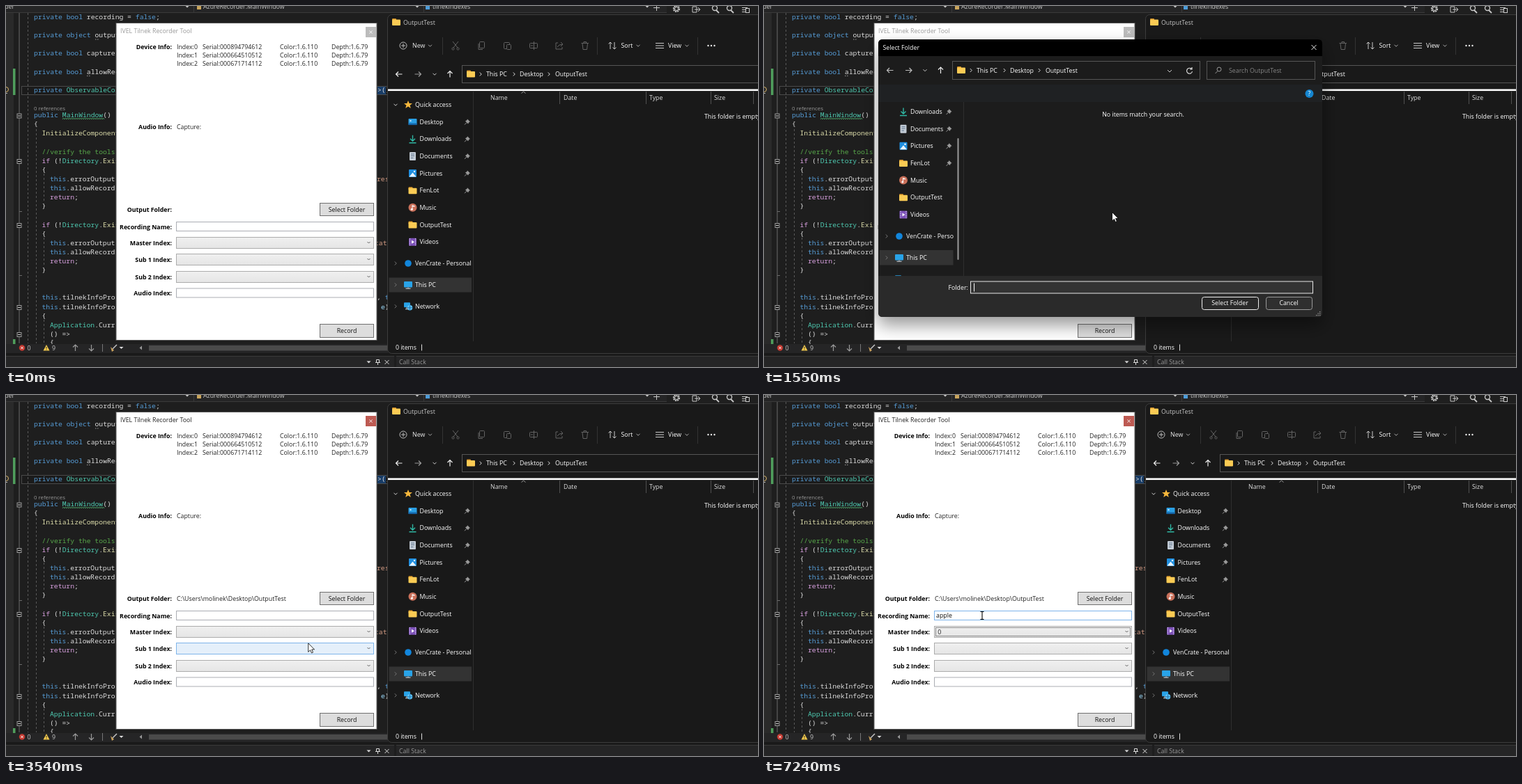
An HTML page that plays this animation: 1079x519 px, repeating every 8000 ms.

```html
<!DOCTYPE html>
<html lang="en">
<head>
<meta charset="utf-8">
<title>Recorder tool</title>
<style>
html, body { margin: 0; width: 100%; height: 100%; overflow: hidden; background: #1e1e1e; }
svg { display: block; }
text { font: 8.8px "Open Sans", "Noto Sans", sans-serif; white-space: pre; }
.b { font-weight: 700; text-anchor: end; }
.m { text-anchor: middle; }
.c { font: 9.73px "Noto Sans Mono", "DejaVu Sans Mono", monospace; }
</style>
</head>
<body>
<svg id="stage" width="1079" height="519" viewBox="0 0 1079 519" xmlns="http://www.w3.org/2000/svg"></svg>
<script>
const LOOP = 8000;

// ---- drawing helpers: every y of a text is the middle of its capitals
const T = (x, y, s, fill = '#fff', attr = '') =>
  `<text x="${x}" y="${y + 3.1}" fill="${fill}" ${attr}>${s}</text>`;
const R = (x, y, w, h, fill, attr = '') =>
  `<rect x="${x}" y="${y}" width="${w}" height="${h}" fill="${fill}" ${attr}/>`;
const box = (x, y, w, h, fill, line, attr = '') =>
  R(x + .5, y + .5, w - 1, h - 1, fill, `stroke="${line}" ${attr}`);
const P = (d, line, attr = '') => `<path d="${d}" fill="none" stroke="${line}" ${attr}/>`;
const F = (d, fill) => `<path d="${d}" fill="${fill}"/>`;
const O = (x, y, r, fill, attr = '') => `<circle cx="${x}" cy="${y}" r="${r}" fill="${fill}" ${attr}/>`;
const G = (id, s, attr = '') => `<g id="${id}" ${attr}>${s}</g>`;
const at = (x, y, s) => `<g transform="translate(${x} ${y})">${s}</g>`;

const down = (x, y, c = '#aaa', w = 2.5) => P(`M${x - w} ${y - w / 2}l${w} ${w}l${w} ${-w}`, c);
const right = (x, y, c = '#ddd', w = 2.5) => P(`M${x - w / 2} ${y - w}l${w} ${w}l${-w} ${w}`, c);
const drop = (x, y, c = '#ddd') => F(`M${x - 3} ${y - 1.5}h6l-3 3z`, c);
const cross = (x, y, r, c) => P(`M${x - r} ${y - r}l${2 * r} ${2 * r}m0 ${-2 * r}l${-2 * r} ${2 * r}`, c);
const arrow = (x, y, turn, c) =>
  `<g transform="translate(${x} ${y}) rotate(${turn})">${P('M-4.5 0H4.5M1 -3.5L4.5 0L1 3.5', c, 'stroke-width="1.2"')}</g>`;

// ---- icons, centred on 0,0
const icon = {
  folder: R(-6, -5, 6, 4, '#d9972a', 'rx="1"') + R(-6, -3.5, 12, 8.5, '#fbcb54', 'rx="1"'),
  desktop: R(-6, -4.5, 12, 9, '#2a9fe4', 'rx="1"') + R(-6, 2, 12, 2.5, '#1464a8') + R(-4, -2.5, 2, 2, '#cfeaff'),
  load: P('M0 -5.5V3M-3.5 -.5L0 3L3.5 -.5M-5 5.5H5', '#2fb8a4', 'stroke-width="1.4"'),
  doc: R(-4.5, -6, 9, 12, '#c3ccd6', 'rx="1"') + P('M-2.5 -3H2.5M-2.5 -.5H2.5M-2.5 2.5H1', '#60758c'),
  pic: R(-5.5, -5.5, 11, 11, '#1f8fe0', 'rx="1"') + F('M-5 5L0 -1L5 5z', '#e9f6ff') + O(2.5, -2.5, 1.2, '#fff'),
  music: O(0, 0, 6, '#c9705a') + F('M-1 -3.5L3 -2.5V-1L0 -1.5V2.5H-1z', '#fff') + O(-1.2, 2.3, 1.5, '#fff'),
  video: R(-5.5, -5.5, 11, 11, '#7d52b8', 'rx="1"') + P('M-4 -5V5M4 -5V5', '#e5d8f8', 'stroke-dasharray="1.5 1.5"') + F('M-1.5 -2.5L2.5 0L-1.5 2.5z', '#fff'),
  store: O(0, 0, 4.8, '#1286dc'),
  pc: R(-6, -5, 12, 8.5, '#29a3e8', 'rx="1"') + R(-1, 3.5, 2, 1.5, '#888') + R(-3.5, 4.7, 7, 1.2, '#b8c4cc'),
  net: R(-6, -5.5, 9, 7, '#29a3e8', 'rx="1"') + P('M-4 4H0M-2 1V4', '#c9d4dc') + O(2.5, 2, 3.8, '#5cc0f2') + P('M-1 2H6M2.5 -1.5V6', '#1769a6', 'stroke-width=".8"'),
  pin: F('M0 -4L4 0L2.5 .5L1 3L-3 -1L-.5 -2.5z', '#9a9a9a') + P('M-1 1L-4 4', '#9a9a9a')
};
const put = (name, x, y) => at(x, y, icon[name]);

const places = [
  ['Desktop', 'desktop', 1], ['Downloads', 'load', 1], ['Documents', 'doc', 1], ['Pictures', 'pic', 1],
  ['FenLot', 'folder', 1], ['Music', 'music'], ['OutputTest', 'folder'], ['Videos', 'video']
];
const sideList = (x, y, list, pinX) =>
  list.map(([name, ic, pin], i) => {
    const v = y + i * 24.65;
    return put(ic, x, v) + T(x + 10, v, name) + (pin ? put('pin', pinX, v) : '');
  }).join('');
const roots = (x, y, list) =>
  list.map(([name, ic], i) =>
    right(x, y + i * 30.9, '#777') + put(ic, x + 18, y + i * 30.9) + T(x + 28, y + i * 30.9, name)).join('');
const trail = (x, y) => put('folder', x, y - .5) +
  right(x + 14, y) + T(x + 22, y, 'This PC') + right(x + 62, y) + T(x + 70, y, 'Desktop') +
  right(x + 112, y) + T(x + 121, y, 'OutputTest');

// ---- code editor
const ink = { k: '#569cd6', p: '#d8a0df', m: '#dcdcaa', t: '#4ec9b0', g: '#57a64a', s: '#d69d85', w: '#dcdcdc', v: '#9cdcfe' };
const code = (x, y, spec) => `<text class="c" x="${x}" y="${y + 3.3}">` +
  spec.split('|').map(s => `<tspan fill="${ink[s[0]]}">${s.slice(1)}</tspan>`).join('') + '</text>';

function editor() {
  const check = 'pif |w(!|tDirectory|w.|mExists';
  const lines = [
    [40, 16, 'kprivate bool |wrecording = |kfalse|w;'], [40, 42, 'kprivate object |woutput'],
    [40, 68, 'kprivate bool |wcapture'], [40, 94.5, 'kprivate bool |wallowRec'],
    [40, 121, 'kprivate |tObservableCol'], [40, 157, 'kpublic |tMainWindow|w()'], [40, 170, 'w{'],
    [51.5, 183, 'mInitializeComponent'], [51.5, 209.5, 'g//verify the tools'],
    [51.5, 223, check], [51.5, 236, 'w{'], [63, 248.5, 'kthis|w.errorOutput'],
    [63, 262, 'kthis|w.allowRecord'], [63, 275, 'preturn|w;'], [51.5, 288, 'w}'],
    [51.5, 314.5, check], [51.5, 328, 'w{'], [63, 341, 'kthis|w.errorOutput'],
    [63, 354, 'kthis|w.allowRecord'], [63, 367, 'preturn|w;'], [51.5, 380, 'w}'],
    [51.5, 419, 'kthis|w.tilnekInfoPro'], [51.5, 432.5, 'kthis|w.tilnekInfoPro'], [51.5, 446, 'w{'],
    [63, 459, 'tApplication|w.Curr'], [63, 471.5, 'w() =&gt;'], [63, 484, 'w{'],
    [533, 121, 'w&gt;()'], [532, 248.5, 'srest'], [529, 341, 'scatio'], [532, 419, 'w, |kt'], [538, 432.5, 've|w)']
  ];
  const dash = 'stroke-dasharray="3 3"';
  return R(0, 0, 1079, 519, '#1e1e1e') + R(0, 10, 11, 476, '#2a2a2a') +
    R(10, 90, 3.5, 38, '#4f9e5c') + R(10, 479, 3.5, 7, '#4f9e5c') +
    box(22, 115, 540, 13, '#1b1b1b', '#4a4a4a') + R(533, 116, 12, 11, '#183c66') +
    O(0, 120, 3.5, 'none', 'stroke="#d9b46a"') + P('M-1 125.5H2', '#bbb') +
    P('M19 10V485', '#6a6a6a') + P('M19 295.500h4M19 387.500h4', '#6a6a6a') +
    P('M31.500 10V485M43.500 177V485M54.500 241V283M54.500 333V375M54.500 451V485', '#5a5a5a', dash) +
    [158, 223.5, 315.5, 433.5, 472.5].map(y => box(15.5, y - 3.5, 7, 7, '#1e1e1e', '#9a9a9a') + P(`M17 ${y}h4`, '#ccc')).join('') +
    lines.map(a => code(...a)).join('') + T(40, 146.5, '0 references', '#999', 'style="font-size:7.8px"') +
    P('M128 48h6M116 100.500h6', '#999', 'stroke-dasharray="1.500 1.500"') +
    P('M81 163' + 'l1.5 -2l1.5 2'.repeat(20), '#4ca56a', 'stroke-width=".9"');
}

function frameBars() {
  const c = '#c8c8c8';
  return R(0, 0, 948, 9.5, '#252526') + R(948, 0, 131, 13, '#1f1f1f') + P('M0 9.500H948', '#3a3a3a') +
    T(-2, 1, 'der', c) + drop(260, 1, c) + R(274, 0, 6, 5, '#c8a45c') + T(283, 1, 'AzureRecorder.MainWindow', c) +
    P('M269.500 0V9M599.500 0V9', '#3a3a3a') + drop(590, 1, c) + R(602, 0, 6, 5, '#4d9bd8') + T(612, 1, 'tilnekIndexes', c) +
    drop(920, 1, c) + P('M929 2.500h9M933.500 0V7', c) +
    O(962, 4, 4, 'none', `stroke="${c}" stroke-width="2.200" stroke-dasharray="2 1"`) + O(962, 4, 2.5, 'none', `stroke="${c}"`) +
    P('M985 1H991V9H985zM988 5H996M993 2L996 5L993 8', c) +
    [1017, 1038].map(x => O(x, 3, 3.5, 'none', `stroke="${c}" stroke-width="1.400"`) + P(`M${x + 2} 6l4 4`, c, 'stroke-width="1.800"')).join('') +
    P('M1056 2.500h8M1056 5.500h5M1056 8.500h5', c) + box(1061, 3, 6, 7, 'none', c) +
    R(0, 486, 548, 13, '#252526') + O(23, 491.5, 4.2, '#c6382f') + cross(23, 491.5, 1.7, '#fff') + T(30.5, 491.5, '0', c) +
    F('M58 487L62.500 495.500H53.500z', '#f2c94c') + P('M58 490V492.500M58 493.500V494.500', '#222') + T(66, 491.5, '9', c) +
    arrow(99.5, 491.5, -90, '#9a9a9a') + arrow(122.5, 491.5, 90, '#9a9a9a') + P('M138.500 486V497', '#777') +
    P('M153 493L159 487', '#c8c8c8', 'stroke-width="1.500"') + F('M150 490L155 495L152 497z', '#cda45e') + drop(165.5, 491.5) +
    F('M195 488.500V494.500L191.500 491.500z', '#999') + R(205, 488, 344, 7.5, '#4a4a4a') +
    R(0, 499, 1079, 4, '#1a1a1a') + R(0, 503, 557, 16, '#252526') + R(560, 503, 519, 16, '#252526') +
    P('M0 503.500H557M560 503.500H1079', '#3a3a3a') +
    drop(520.5, 512) + P('M531.500 508.500h4v4h-4zM530 512.500h7M533.500 513V516', '#ddd') + cross(546.5, 512, 3, '#ddd') +
    T(564, 512, 'Call Stack', '#999');
}

// ---- file browser
function explorer() {
  const dim = '#626262', y = 57;
  return box(547, 12, 560, 488, '#191919', '#3d3d3d', 'rx="6"') +
    put('folder', 560, 23) + T(570, 23.5, 'OutputTest', '#c4c4c4') +
    O(570, y, 5, 'none', 'stroke="#bbb"') + P('M567 57h6M570 54v6', '#bbb') + T(583, y, 'New', '#eee') + down(608.5, y) +
    P('M641 51L648 60M649 51L642 60', dim) + O(641.5, 61.5, 1.6, 'none', `stroke="${dim}"`) + O(648.5, 61.5, 1.6, 'none', `stroke="${dim}"`) +
    box(679, 51, 8, 10, 'none', dim, 'rx="1"') + P('M678 54V62.500H684', dim) +
    box(714, 52, 9, 10, 'none', dim, 'rx="1"') + box(718, 55, 7, 8, '#191919', dim, 'rx="1"') +
    box(751, 53, 12, 8, 'none', dim, 'rx="1"') + P('M757.500 51V63M753 57h3', dim) +
    P('M792 53H789V62H798V59M791 59Q793 55 799 55M796 52L799 55L796 58', dim) +
    P('M825.500 53.500H836M827 54L828 62.500H833.500L834.500 54M829 53V51.500H832.500V53', dim) +
    P('M626.500 45V70M848.500 45V70M992.500 45V70', '#333') +
    P('M867 62V52M864.500 54.500L867 52L869.500 54.500M873 52V62M870.500 59.500L873 62L875.500 59.500', '#ccc') +
    T(882.5, y, 'Sort') + down(907, y) +
    P('M932 53.500H944M932 57H944M932 60.500H944', '#ccc') + T(950, y, 'View') + down(977, y) +
    [1007.5, 1012, 1016.5].map(x => O(x, y, 1.2, '#eee')).join('') +
    arrow(564, 98, 180, '#eee') + arrow(591, 98, 0, '#999') + down(615, 98, '#ccc') + arrow(637, 98, -90, '#eee') +
    box(654, 85, 440, 26, '#191919', '#555') + trail(667, 98) +
    P('M670.500 123V482', '#2e2e2e') +
    R(548, 119.5, 540, 2.6, '#fff') + P('M739.500 125.500l3 -2.500l3 2.500', '#999') +
    T(695, 132, 'Name', '#ddd') + T(800, 132, 'Date', '#ddd') + T(923, 132, 'Type', '#ddd') + T(1016, 132, 'Size', '#ddd') +
    P('M794.500 123V141M918.500 123V141M1011.500 123V141M1072.500 123V141', '#505050') +
    T(1002, 158.5, 'This folder is empty.') +
    R(549.5, 390.5, 118.5, 21, '#333') + G('netHover', R(549.5, 421.5, 119, 21.5, '#484848')) +
    down(559, 142, '#ccc') + F('M577 136l1.700 4h4.300l-3.400 2.700l1.200 4.300l-3.800 -2.500l-3.800 2.500l1.200 -4.300l-3.400 -2.700h4.300z', '#f6b73c') + T(587, 142, 'Quick access') +
    sideList(583.5, 166.6, places, 662) +
    roots(559, 370, [['VenCrate - Personal', 'store'], ['This PC', 'pc'], ['Network', 'net']]) +
    T(559, 491.2, '0 items') + P('M596.500 486.500V495.500', '#ddd');
}

// ---- recorder tool
const button = (id, x, y, w, h, s) => box(x, y, w, h, '#ddd', '#707070', `id="${id}"`) + T(x + w / 2, y + h / 2, s, '#111', 'class="m"');
const combo = (id, y) => box(244, y, 284, 17, 'url(#soft)', '#acacac', `id="${id}"`) + down(520.5, y + 8, '#606060', 2);
const label = (y, s) => T(238, y, s, '#000', 'class="b"');

function tool() {
  const rows = ['000894794612', '000664510512', '000671714112'].map((n, i) => {
    const y = 58.5 + i * 12.4;
    return T(245, y, 'Index:' + i, '#222') + T(282, y, 'Serial:' + n, '#222') + T(393, y, 'Color:1.6.110', '#222') + T(467, y, 'Depth:1.6.79', '#222');
  }).join('');
  return box(157.5, 24, 375, 457, '#fff', '#5a5a5a') + T(164, 36, 'IVEL Tilnek Recorder Tool', '#999', 'id="toolTitle"') +
    R(516, 30, 15, 15, '#bcbcbc', 'id="toolClose"') + cross(523.5, 37.5, 2, '#fff') +
    label(58.5, 'Device Info:') + rows + label(174, 'Audio Info:') + T(245, 174, 'Capture:', '#222') +
    label(293, 'Output Folder:') + G('path', T(245, 293, 'C:\\Users\\molinek\\Desktop\\OutputTest', '#222')) +
    button('pick', 450, 283, 78, 19, 'Select Folder') +
    label(317.5, 'Recording Name:') + box(244, 310, 284, 14, '#fff', '#abadb3', 'id="nameBox"') +
    T(247, 317, '', '#111', 'id="typed"') + R(247, 311.5, 1, 11.5, '#000', 'id="caret"') +
    label(340.5, 'Master Index:') + combo('c0', 332) + label(365, 'Sub 1 Index:') + combo('c1', 356) +
    label(390, 'Sub 2 Index:') + combo('c2', 381) +
    G('focus', box(246, 334, 280, 13, 'none', '#333', 'stroke-dasharray="1 1"')) + G('zero', T(249.3, 340.5, '0', '#222')) +
    label(413, 'Audio Index:') + box(244, 405.5, 284, 14, '#fff', '#abadb3') + button('record', 450, 457, 78, 20, 'Record');
}

// ---- folder dialog
function dialog() {
  return R(164, 48, 637, 399, '#1b1b1b', 'rx="6" filter="url(#shade)"') +
    F('M164 72V54q0 -6 6 -6H795q6 0 6 6V72z', '#000') + R(164, 113, 637, 25, '#1f2123') +
    F('M164 388H801V441q0 6 -6 6H170q-6 0 -6 -6z', '#2a2a2a') +
    T(170.5, 60, 'Select Folder') + cross(789, 59.5, 3.5, '#eee') +
    arrow(181, 92.5, 180, '#bbb') + arrow(207.5, 92.5, 0, '#bbb') + down(231, 92.5, '#ccc') + arrow(253.5, 92.5, -90, '#eee') +
    box(270, 79, 356, 27, '#1b1b1b', '#555') + trail(283, 92.5) + down(582, 93.5, '#ccc', 3) +
    P('M613.500 90.500A4 4 0 1 0 614.500 94M614 88V91H611', '#ddd', 'stroke-width="1.200"') +
    box(635, 79, 156, 27, '#1b1b1b', '#555') + O(653, 91, 3, 'none', 'stroke="#999"') + P('M651 93.500l-3.500 3.500', '#999') +
    T(667, 92.5, 'Search OutputTest', '#858585') +
    G('tools', T(178, 126, 'Organize') + drop(222, 126) + T(248.5, 126, 'New folder') +
      box(728, 120, 13, 11, '#1f2123', '#eee') + R(731, 122, 7, 6, '#eee') + drop(750.5, 126)) +
    O(782.5, 126, 6, '#1585cf') + T(782.5, 126, '?', '#fff', 'class="m"') +
    `<g clip-path="url(#side)">` + R(166, 351, 105.5, 21.5, '#333') + sideList(200, 152, places.slice(1), 265.5) +
    roots(176, 331, [['VenCrate - Personal', 'store'], ['This PC', 'pc'], ['Network', 'net']]) + '</g>' +
    R(277.5, 190, 2, 175, '#9a9a9a', 'rx="1"') + P('M286.500 138V388', '#2e2e2e') +
    T(544, 155.5, 'No items match your search.', '#fff', 'class="m"') +
    T(264.5, 404.5, 'Folder:') + box(296, 395.5, 492, 18, '#333', '#e8e8e8', 'id="field"') + R(301, 398.5, 1, 12, '#fff', 'id="fieldCaret"') +
    box(628, 418, 82, 19, '#2a2a2a', '#eee', 'id="okBtn" rx="3"') + T(668.5, 427, 'Select Folder', '#fff', 'class="m"') +
    box(720, 418, 67, 19, '#2f2f2f', '#999', 'rx="3"') + T(753, 427, 'Cancel', '#fff', 'class="m"') +
    [[797, 439], [794.5, 441.5], [797, 441.5], [792, 444], [794.5, 444], [797, 444]].map(([x, y]) => R(x, y, 1.3, 1.3, '#999')).join('');
}

const cursors =
  G('glow', O(0, 0, 9.5, '#e8cf1c', 'opacity=".85"')) +
  G('arrow', `<path d="M.5 .5V13L3.400 10.300L5.300 14.500L7.300 13.600L5.500 9.500H9.300z" fill="#fff" stroke="#000" stroke-width=".8"/>`) +
  G('beam', P('M-2.500 -5.500H2.500M0 -5.500V5.500M-2.500 5.500H2.500', '#000', 'stroke-width="1.100"')) +
  G('wait', O(0, 0, 5.5, 'none', 'stroke="#7cc4f0" stroke-width="3.200"') + P('M0 -5.500A5.500 5.500 0 1 1 -5.500 0', '#1a86d8', 'stroke-width="3.200"'));

const stage = document.getElementById('stage');
stage.innerHTML = `<defs>
  <linearGradient id="soft" x2="0" y2="1"><stop stop-color="#f0f0f0"/><stop offset="1" stop-color="#e5e5e5"/></linearGradient>
  <filter id="shade" x="-10%" y="-10%" width="120%" height="130%"><feDropShadow dx="0" dy="12" stdDeviation="12" flood-opacity=".4"/></filter>
  <clipPath id="side"><rect x="164" y="138" width="108" height="250"/></clipPath></defs>` +
  editor() + frameBars() + explorer() + tool() + G('dialog', dialog()) + G('mouse', cursors);

// ---- motion
const el = {};
stage.querySelectorAll('[id]').forEach(n => el[n.id] = n);
const show = (id, on) => el[id].setAttribute('visibility', on ? 'inherit' : 'hidden');
const paint = (id, fill, line) => {
  el[id].setAttribute('fill', fill);
  if (line) el[id].setAttribute('stroke', line);
};
const between = (t, a, b) => t >= a && t < b;

const side = [661, 431], pick = [499, 296], name = [313, 317];
// start, end, steps, from, to
const legs = [
  [570, 1090, 9, side, pick], [2110, 2740, 11, pick, side], [3140, 3800, 10, side, name]
];
const keys = [[5330, 'a'], [5530, 'ap'], [5650, 'app'], [5800, 'appl'], [5930, 'apple']];

function mouseAt(t) {
  if (t < 320) return [777, 478];
  const [a, b, n, from, to] = legs.filter(l => t >= l[0]).pop() || [0, 1, 1, side, side];
  const k = Math.min(1, (Math.floor((t - a) / (b - a) * (n - 1) + 1e-6) + 1) / n);
  const e = (1 - Math.cos(Math.PI * k)) / 2;
  return from.map((v, i) => v + (to[i] - v) * e);
}

function draw(t) {
  const [x, y] = mouseAt(t);
  const open = between(t, 1550, 3020);
  const over = (l, top, r, bottom) => t >= 230 && !open && x >= l && x < r && y >= top && y < bottom;
  const active = between(t, 1320, 1490) || t >= 3020;

  el.toolTitle.setAttribute('fill', active ? '#222' : '#999');
  paint('toolClose', active ? '#bd5a52' : '#bcbcbc');
  show('path', t >= 3020);
  show('netHover', over(549, 421, 668, 443));

  const onPick = over(450, 283, 528, 302);
  const press = onPick && between(t, 1320, 1430);
  paint('pick', press ? '#c4e5f6' : onPick ? '#bee6fd' : '#ddd', press ? '#2c628b' : onPick ? '#3c7fb1' : '#707070');

  const onName = over(244, 310, 528, 324);
  const typing = between(t, 3960, 6390);
  paint('nameBox', '#fff', typing ? '#569de5' : onName ? '#7eb4ea' : '#abadb3');
  [332, 356, 381].forEach((top, i) => {
    const on = over(244, top, 528, top + 17);
    paint('c' + i, on ? '#e4effa' : 'url(#soft)', on ? '#7eb4ea' : '#acacac');
  });

  const text = (keys.filter(k => t >= k[0]).pop() || [0, ''])[1];
  if (el.typed.textContent !== text) el.typed.textContent = text;
  el.caret.setAttribute('x', 247 + (text ? el.typed.getComputedTextLength() : 0));
  show('caret', between(t, 3960, 4710) || between(t, 5170, 6390));
  show('focus', t >= 6450);
  show('zero', t >= 7240);

  show('dialog', open);
  show('tools', t >= 1640);
  const left = t >= 2810;
  const onOk = t >= 2110 && x >= 628 && y >= 418;
  paint('field', '#333', left ? '#8c8c8c' : '#e8e8e8');
  // inherit would override the closed dialog only if set to visible
  show('fieldCaret', t < 2110 || between(t, 2640, 2810));
  paint('okBtn', left ? '#666' : onOk ? '#484848' : '#2a2a2a', left ? '#8a8a8a' : '#eee');

  el.mouse.setAttribute('transform', `translate(${x.toFixed(2)} ${y.toFixed(2)})`);
  const wait = between(t, 1490, 1550);
  show('mouse', t >= 230 && !between(t, 5170, 6390));
  show('beam', onName);
  show('wait', wait);
  show('arrow', !onName && !wait);
  show('glow', between(t, 1320, 1430) || between(t, 2810, 3020) || between(t, 3880, 4180));
}

const start = performance.now();
function tick() {
  draw((performance.now() - start) % LOOP);
  requestAnimationFrame(tick);
}
draw(0);
requestAnimationFrame(tick);
</script>
</body>
</html>
```
